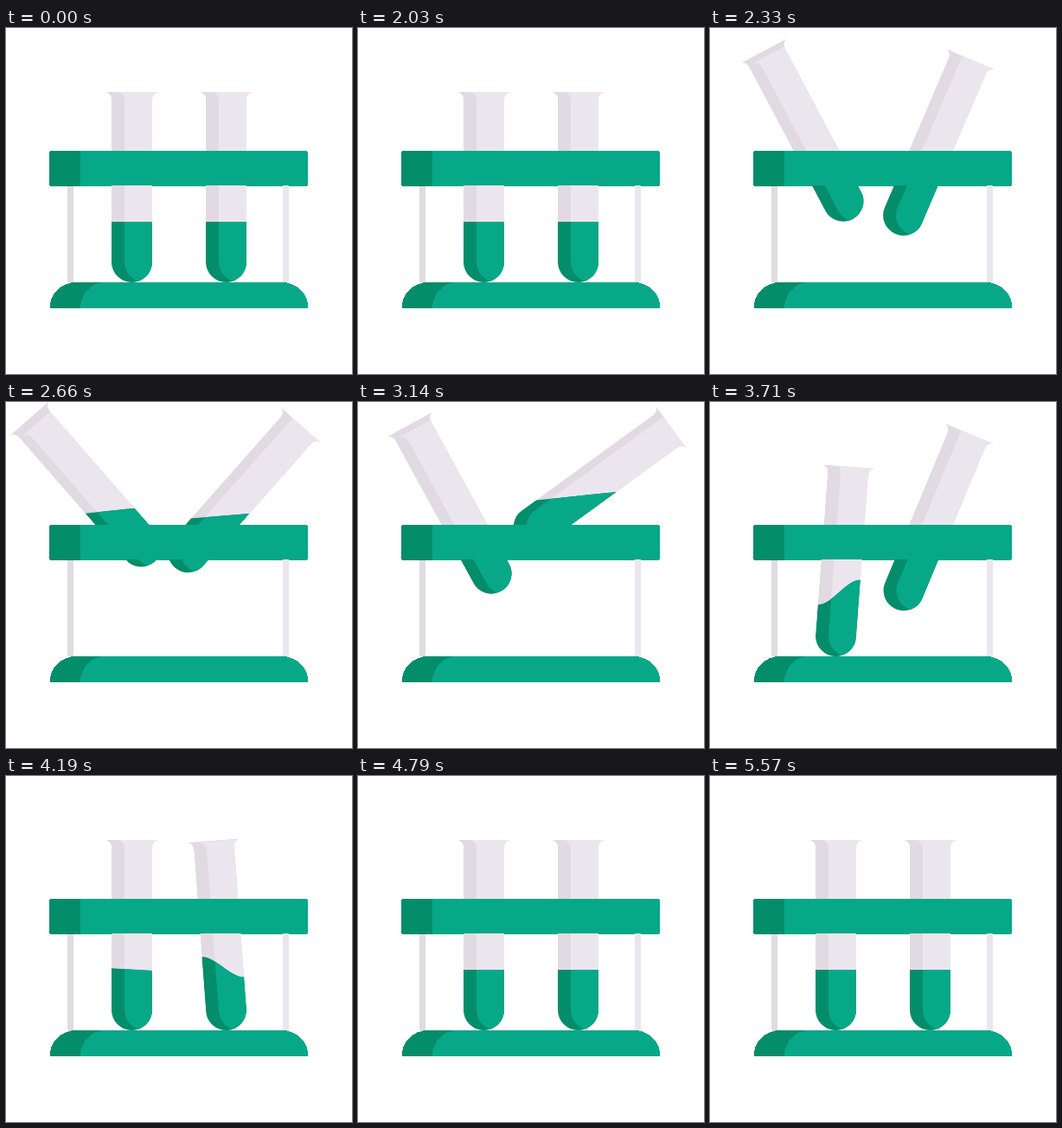
Recreate the animation shown at these times as an HTML page. Size 400 px wide and 400 px high, loop 5.63 s.

```html
<!DOCTYPE html>
<html lang="en">
<head>
<meta charset="utf-8">
<title>Test tubes</title>
<style>
html, body { margin: 0; width: 100%; height: 100%; overflow: hidden; background: #fff; }
svg { display: block; width: 100vw; height: 100vh; }
.rack { shape-rendering: crispEdges; }
.light { fill: #07a888; }
.dark { fill: #048d6a; }
.glass { fill: #ebe6ed; }
.shade { fill: #e1dae3; }
</style>
</head>
<body>
<svg viewBox="0 0 400 400">
  <defs>
    <!-- Tube space: origin at the centre of the round bottom -->
    <path id="shape" d="M-31.5-196.5H31.5Q23.5-195.5 23.5-187V0A23.5 23.5 0 0 1-23.5 0V-187Q-23.5-195.5-31.5-196.5Z"/>
    <clipPath id="body"><use href="#shape"/></clipPath>
  </defs>
  <rect width="400" height="400" fill="#fff"/>
  <g class="rack">
    <rect class="light" x="50" y="142" width="299" height="41" rx="3"/>
    <rect class="shade" x="71" y="182" width="7" height="112"/>
    <rect class="glass" x="320" y="182" width="7" height="112"/>
    <path class="dark" d="M50.5 324A30 30 0 0 1 80.5 294H319.5A30 30 0 0 1 349.5 324Z"/>
    <path class="light" d="M86 324A28 30 0 0 1 114 294H319.5A30 30 0 0 1 349.5 324Z"/>
  </g>
  <g id="tubes"></g>
  <g class="rack">
    <rect class="light" x="50" y="142" width="299" height="40" rx="3"/>
    <path class="dark" d="M86 142H53A3 3 0 0 0 50 145V180A3 3 0 0 0 53 183H86Z"/>
  </g>
</svg>
<script>
const LOOP = 5630, START = 2030, STEP = 30, FALL = 900;
const FLOOR = 270.5, WALL = 23.5, LEVEL = 46.5, SHADE = 15;
const RAD = Math.PI / 180;
const layer = document.getElementById('tubes');

// top: end of the rise; drop: start of the fall; dx, dy, tilt: pose at the peak
const specs = [
  { x: 145.5, side: -1, top: 2700, drop: 2810, dx: 10.7, dy: -104, tilt: -41.3 },
  { x: 254.5, side: 1, top: 3210, drop: 3210, dx: -51.5, dy: -126.5, tilt: 54.2 }
];

const clamp = v => Math.min(1, Math.max(0, v));
const smooth = v => v * v * (3 - 2 * v);

// Height above the rack, from 0 at rest to 1 at the peak
function lift(t, { top, drop }) {
  const up = clamp((t - START) / (top - START));
  const down = clamp((t - drop) / FALL);
  return 1 - (1 - up) ** 1.9 - smooth(down);
}

// Tilt past upright around the landing
function rock(since) {
  return 4.4 * Math.sin(Math.PI * clamp((since + 310) / 700)) ** 2;
}

// Fading swing of the liquid, strongest around the landing
function slosh(since) {
  const fade = Math.exp(-(((since + 150) / 400) ** 2));
  return -34 * fade * Math.cos(2 * Math.PI * (since - 40) / 900);
}

function liquid(angle, p, swing) {
  const slope = 2 * WALL * Math.tan((angle + 6 * p) * RAD) + swing;
  const mean = LEVEL + 4 * p + 0.13 * Math.abs(slope);
  const left = slope / 2 - mean, right = -slope / 2 - mean;
  const pull = (1 - clamp(Math.abs(swing) / 25)) * (right - left) / 3, third = WALL / 3;
  return `M${-WALL} ${left}C${-third} ${left + pull} ${third} ${right - pull} ${WALL} ${right}V30H${-WALL}Z`;
}

const tubes = specs.map((spec, i) => {
  const g = document.createElementNS('http://www.w3.org/2000/svg', 'g');
  g.innerHTML = `<clipPath id="lit${i}"><use class="shift" href="#shape"/></clipPath>
    <g clip-path="url(#body)">
      <use class="shade" href="#shape"/><use class="glass shift" href="#shape"/>
      <path class="dark"/><g clip-path="url(#lit${i})"><path class="light"/></g>
    </g>`;
  layer.append(g);
  return { ...spec, g, fills: g.querySelectorAll('path'), lit: g.querySelectorAll('.shift') };
});

function draw(ms) {
  const t = ms < START ? 0 : START + Math.floor((ms - START) / STEP) * STEP;
  for (const tube of tubes) {
    const { x, side, dx, dy, tilt, g, fills, lit } = tube;
    const since = t - tube.drop - FALL;
    const p = lift(t, tube);
    const angle = tilt * p - side * rock(since);
    g.setAttribute('transform', `translate(${x + dx * p ** 0.6} ${FLOOR + dy * p}) rotate(${angle})`);
    const d = liquid(angle, p, side * slosh(since));
    fills.forEach(f => f.setAttribute('d', d));
    // The lit part is always offset sideways on the stage
    lit.forEach(u => {
      u.setAttribute('x', SHADE * Math.cos(angle * RAD));
      u.setAttribute('y', -SHADE * Math.sin(angle * RAD));
    });
  }
}

const begin = performance.now();
function tick() {
  draw((performance.now() - begin) % LOOP);
  requestAnimationFrame(tick);
}
tick();
</script>
</body>
</html>
```
